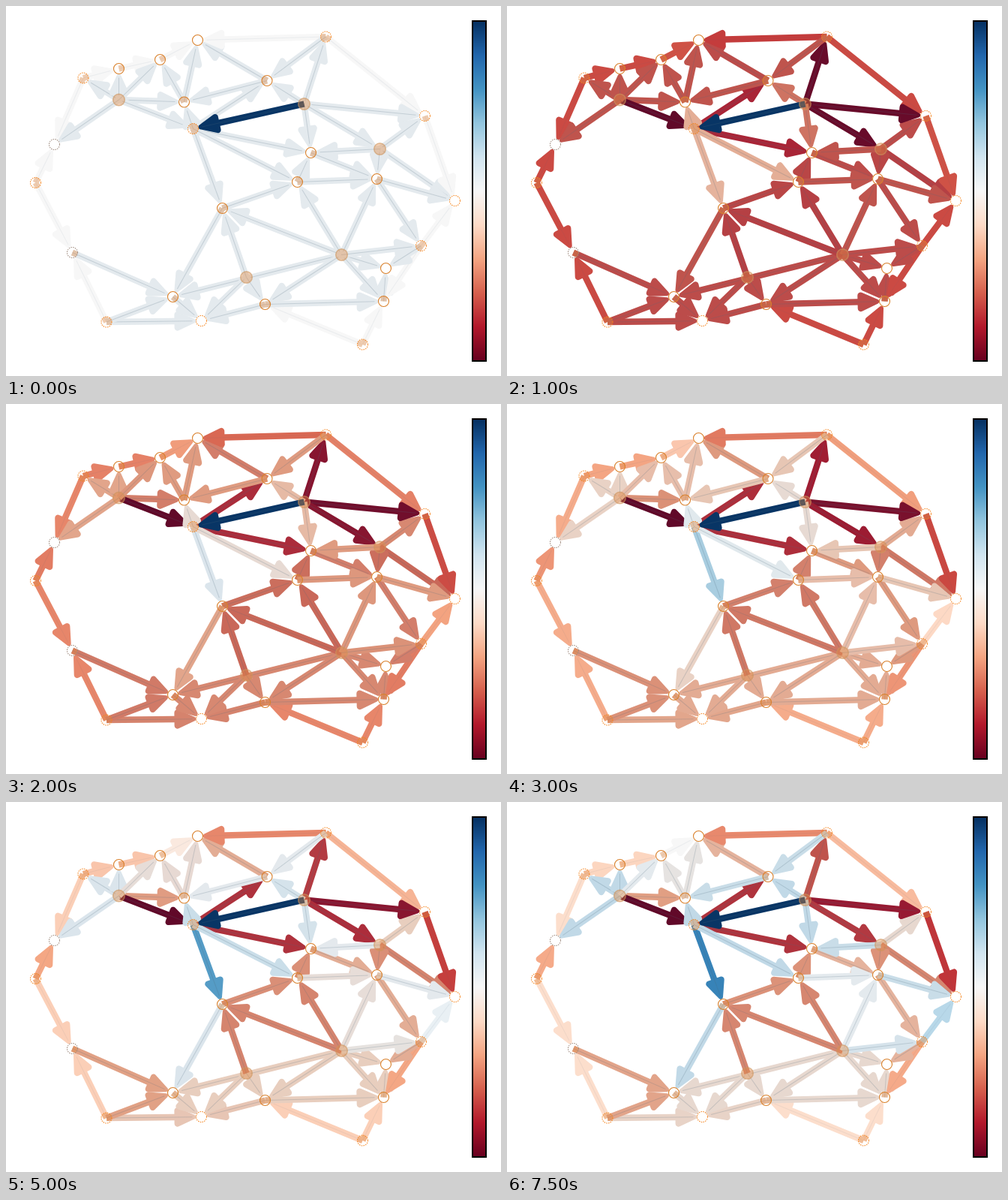
Animation, 660 px wide and 493 px high, one loop 8 s. Source, as an HTML page with a canvas:

```html
<!DOCTYPE html>
<html lang="en">
<head>
<meta charset="utf-8">
<title>Edge flow on a graph</title>
<style>
html, body { margin: 0; width: 100%; height: 100%; overflow: hidden; background: #fff; }
canvas { display: block; width: 660px; height: 493px; }
</style>
</head>
<body>
<canvas id="stage" width="660" height="493"></canvas>
<script>
const ctx = document.getElementById('stage').getContext('2d');
const STEP = 500, STEPS = 16, R = 7;

const nodes = {
  A: [255.5, 45.5], B: [426.5, 41], C: [205.5, 71.5], D: [150.5, 83.5], E: [103, 96],
  F: [150.5, 125], G: [237.5, 128], H: [348, 99.5], I: [397.5, 130.5], J: [249.5, 163.5],
  K: [64.5, 184.5], L: [39.5, 235.5], M: [88.5, 328.5], N: [134, 421], O: [222.5, 387.5],
  P: [260.5, 419.5], Q: [320.5, 361.5], R: [345.5, 397.5], S: [288.5, 269.5], T: [388.5, 234.5],
  U: [406.5, 195.5], V: [498.5, 190.5], W: [494.5, 230.5], X: [558.5, 146.5], Y: [598.5, 259.5],
  Z: [553.5, 319.5], a: [447.5, 331.5], b: [506.5, 349.5], c: [503.5, 393.5], d: [475.5, 451]
};
const filled = 'FIVQa', dotted = 'BEJXYLNPZKMd', grey = 'KM';
const rim = 'BA BX XY CA DC ED EK LK LM NM dR dc Zc ZY'.split(' ');

// Groups of edges: level at step 2, level at step 15, rate, edges
const groups = [
  [.17, .41, .2, 'LM NM NP dR dc RP EK'],
  [.17, .39, .2, 'ED DC'],
  [.17, .43, .2, 'aO aR Rc ab cb ac QP QR OP VX'],
  [.17, .31, .35, 'MO NO Zc LK'],
  [.17, .34, .3, 'WZ Zb UW HA BX'],
  [.15, .26, .4, 'aS aT QS VY BA'],
  [.16, .28, .35, 'VW TU ST'],
  [.18, .3, .4, 'FG'],
  [.18, .14, .03, 'XY'],
  [.01, .08, .05, 'IX'],
  [.01, .14, .2, 'IV'],
  [.01, .18, .12, 'IB'],
  [0, 0, 1, 'FJ'],
  [.11, .13, .3, 'JH JU'],
  [.34, .83, .22, 'JS'],
  [.33, .6, .25, 'JT JG'],
  [.23, .6, .18, 'IH IU'],
  [.18, .58, .13, 'BH HG VU WY'],
  [.18, .6, .16, 'FE FD FK SO'],
  [.18, .5, .18, 'FC TW aW CA'],
  [.18, .47, .23, 'GC GA'],
  [.17, .64, .12, 'ZY'],
  [.17, .54, .14, 'aZ'],
  [1, 1, 1, 'IJ']
];
const edges = groups.flatMap(([from, to, rate, list]) =>
  list.split(' ').map(id => ({ id, from, to, rate, rim: rim.includes(id) })));

const ramp = ['67001f', 'b2182b', 'd6604d', 'f4a582', 'fddbc7', 'f7f7f7',
  'd1e5f0', '92c5de', '4393c3', '2166ac', '053061']
  .map(h => [0, 2, 4].map(i => parseInt(h.slice(i, i + 2), 16)));

function color(v) {
  const x = Math.min(1, Math.max(0, v)) * 10, i = Math.min(9, Math.floor(x));
  return `rgb(${ramp[i].map((c, k) => Math.round(c + (ramp[i + 1][k] - c) * (x - i)))})`;
}

function level(e, step) {
  if (e.id === 'IJ') return 1;
  if (step === 0) return .5;
  const p = (1 - Math.exp(-e.rate * (step - 2))) / (1 - Math.exp(-e.rate * 13));
  return e.from + (e.to - e.from) * p;
}

// Arrow along +x from the origin, with rounded head corners
function arrowPath(tip) {
  const neck = tip - 33, w = 4.2, h = 15;
  ctx.beginPath();
  ctx.moveTo(0, -w);
  ctx.lineTo(neck, -w);
  ctx.arcTo(neck, -h, tip, 0, 4);
  ctx.arcTo(tip, 0, neck, h, 3);
  ctx.arcTo(neck, h, neck, w, 4);
  ctx.lineTo(neck, w);
  ctx.lineTo(0, w);
  ctx.closePath();
}

function drawEdge(e, step) {
  const [x, y] = nodes[e.id[0]], [x2, y2] = nodes[e.id[1]];
  const len = Math.hypot(x2 - x, y2 - y);
  ctx.save();
  ctx.translate(x, y);
  ctx.rotate(Math.atan2(y2 - y, x2 - x));
  arrowPath(len - 3);
  ctx.fillStyle = color(level(e, step));
  ctx.fill();
  if (!e.rim) {
    ctx.fillStyle = 'rgba(40,100,140,.09)';
    ctx.fill();
  }
  ctx.fillStyle = `rgba(80,105,125,${e.rim ? .08 : .22})`;
  ctx.fillRect(0, -.5, len - 12, 1);
  ctx.restore();
}

function drawNode(id) {
  const [x, y] = nodes[id], full = filled.includes(id);
  const disc = new Path2D();
  disc.arc(x, y, full ? R + .8 : R, 0, 7);
  ctx.save();
  ctx.clip(disc);
  ctx.beginPath();
  if (full) ctx.rect(x - 9, y - 9, 18, 18);
  else for (const e of edges) {
    if (e.id[0] !== id) continue;
    const [x2, y2] = nodes[e.id[1]], t = Math.atan2(y2 - y, x2 - x);
    const c = Math.cos(t), s = Math.sin(t);
    ctx.moveTo(x - s * 4, y + c * 4);
    ctx.lineTo(x + s * 4, y - c * 4);
    ctx.lineTo(x + s * 4 + c * 9, y - c * 4 + s * 9);
    ctx.lineTo(x - s * 4 + c * 9, y + c * 4 + s * 9);
    ctx.closePath();
  }
  ctx.fillStyle = 'rgba(222,135,65,.4)';
  ctx.fill();
  ctx.restore();

  ctx.save();
  if (dotted.includes(id)) ctx.setLineDash([1.5, 1.3]);
  ctx.lineWidth = full ? 1.5 : 1.1;
  ctx.strokeStyle = full ? 'rgba(205,150,95,.6)' : grey.includes(id) ? '#a08d80'
    : dotted.includes(id) ? '#f5851f' : '#d9802b';
  ctx.stroke(disc);
  ctx.restore();
}

function drawBar() {
  const top = 20, height = 453;
  for (let i = 0; i < height; i++) {
    ctx.fillStyle = color(1 - i / (height - 1));
    ctx.fillRect(622, top + i, 18, 1);
  }
  ctx.strokeStyle = '#000';
  ctx.lineWidth = 2;
  ctx.strokeRect(622, top, 18, height);
}

function draw(step) {
  ctx.fillStyle = '#fff';
  ctx.fillRect(0, 0, 660, 493);
  edges.forEach(e => drawEdge(e, step));
  Object.keys(nodes).forEach(drawNode);
  drawBar();
}

const start = performance.now();
let shown = -1;
function tick() {
  const step = Math.floor((performance.now() - start) / STEP) % STEPS;
  if (step !== shown) draw(shown = step);
  requestAnimationFrame(tick);
}
tick();
</script>
</body>
</html>
```
